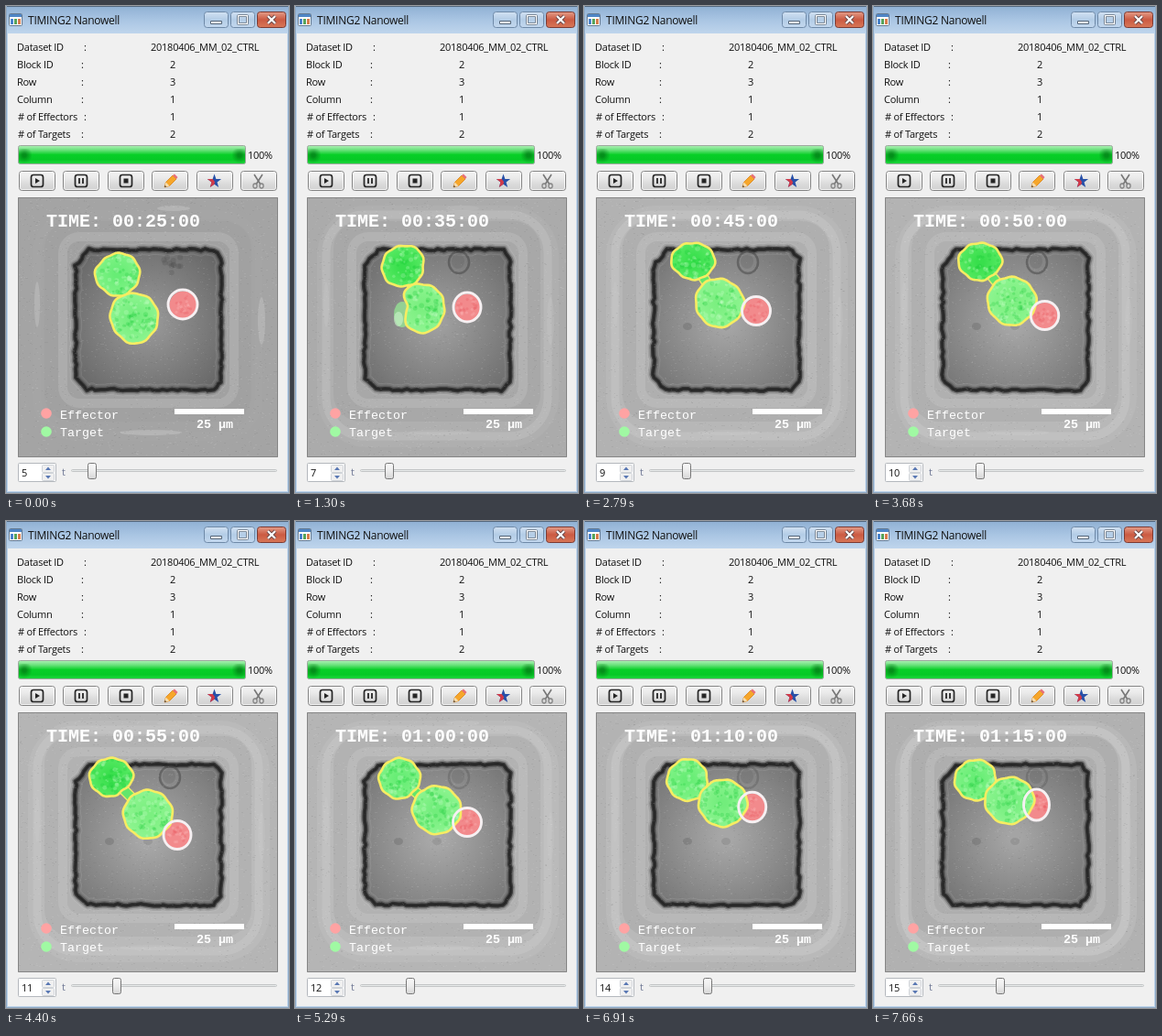
An HTML page with a canvas that plays this animation: 309 by 532 pixels, repeating every 8000 ms.

```html
<!DOCTYPE html>
<html lang="en">
<head>
<meta charset="utf-8">
<title>Nanowell viewer</title>
<style>
  html, body { margin: 0; width: 100%; height: 100%; overflow: hidden; background: #f0f0f0; }
  canvas, svg { position: absolute; left: 0; top: 0; width: 309px; height: 532px; display: block; }
  text { white-space: pre; }
  .ui { font: 11px "Open Sans", sans-serif; letter-spacing: -.25px; fill: #111; }
  .title { font-size: 12px; }
  .mid { text-anchor: middle; }
  .mono { font: bold 13.33px "Liberation Mono", monospace; fill: #fff; }
  .clock { font-size: 20px; }
  .note { font-weight: normal; }
</style>
</head>
<body>
<canvas id="view" width="309" height="532"></canvas>
<svg viewBox="0 0 309 532">
  <g class="ui">
    <text class="title" x="24" y="20">TIMING2 Nanowell</text>
    <text x="12" y="49">Dataset ID</text><text x="85" y="49">:</text>
    <text x="158" y="49">20180406_MM_02_CTRL</text>
    <text x="12" y="68">Block ID</text><text x="82" y="68">:</text>
    <text class="mid" x="182" y="68">2</text>
    <text x="12" y="87">Row</text><text x="82" y="87">:</text>
    <text class="mid" x="182" y="87">3</text>
    <text x="12" y="106">Column</text><text x="82" y="106">:</text>
    <text class="mid" x="182" y="106">1</text>
    <text x="13" y="125"># of Effectors</text><text x="85" y="125">:</text>
    <text class="mid" x="182" y="125">1</text>
    <text x="13" y="144"># of Targets</text><text x="82" y="144">:</text>
    <text class="mid" x="182" y="144">2</text>
    <text x="264" y="167">100%</text>
    <text id="step" x="17" y="514"></text>
    <text x="61" y="513" style="fill:#6f7894">t</text>
  </g>
  <g class="mono">
    <text id="clock" class="clock" x="44" y="241"></text>
    <text class="note" x="59" y="451">Effector</text>
    <text class="note" x="59" y="470">Target</text>
    <text x="208" y="461">25 μm</text>
  </g>
</svg>
<script>
const ctx = document.getElementById('view').getContext('2d');
const stepText = document.getElementById('step');
const clockText = document.getElementById('clock');

const LOOP = 8000, FIRST = 5;
const CHANGES = [430, 1300, 2040, 2790, 3680, 4400, 5290, 6170, 6910, 7660];
const KEYS = [5, 7, 8, 9, 11, 13, 15];

// Centre, then eight radii clockwise from the right
const UPPER = [
  [122, 293, 24, 23, 24, 23, 25, 22, 23, 24],
  [118, 285, 22, 22, 21, 23, 23, 23, 23, 25],
  [118, 283, 21, 22, 23, 22, 22, 22, 23, 23],
  [119, 279, 24, 21, 20, 20, 24, 22, 20, 22],
  [115, 280, 24, 19, 21, 22, 24, 22, 21, 22],
  [114, 283, 21, 22, 23, 22, 22, 22, 24, 22],
  [112, 283, 22, 23, 22, 22, 23, 22, 22, 23]
];
const LOWER = [
  [140, 341, 26, 26, 28, 25, 26, 28, 27, 27],
  [140, 329, 23, 25, 28, 26, 17, 27, 25, 24],
  [140, 331, 27, 26, 27, 25, 26, 27, 26, 26],
  [148, 324, 27, 26, 27, 26, 26, 27, 26, 25],
  [155, 320, 27, 26, 27, 26, 27, 26, 26, 26],
  [154, 311, 27, 26, 26, 25, 26, 26, 26, 26],
  [149, 305, 27, 25, 26, 26, 27, 25, 25, 26]
];
// Centre and radii
const EFFECTOR = [
  [193, 326, 16, 16], [188, 329, 15, 16], [184, 341, 15.5, 16], [188, 333, 15.5, 15.5],
  [187, 343, 15, 15.5], [189, 315, 16, 15.5], [178.5, 310, 14, 17]
];
const LIGHT = [[164], [171], [186], [178], [181], [181], [177]];
const DEPTH = [[.05], [.55], [.75], [.6], [.6], [.6], [.8]];

const gray = (v, a = 1) => `rgba(${v | 0},${v | 0},${v | 0},${a})`;

function random(seed) {
  let s = seed >>> 0;
  return () => (s = (s * 1664525 + 1013904223) >>> 0) / 4294967296;
}

function pose(list, t) {
  let i = 0;
  while (i < KEYS.length - 2 && t >= KEYS[i + 1]) i++;
  const p = (t - KEYS[i]) / (KEYS[i + 1] - KEYS[i]);
  return list[i].map((v, k) => v + (list[i + 1][k] - v) * p);
}

function rounded(x, y, w, h, r, fill, line, width = 1) {
  ctx.beginPath();
  ctx.roundRect(x, y, w, h, r);
  if (fill) { ctx.fillStyle = fill; ctx.fill(); }
  if (line) { ctx.strokeStyle = line; ctx.lineWidth = width; ctx.stroke(); }
}

function shape(points, fill, line, width = 1) {
  ctx.beginPath();
  points.forEach(([x, y]) => ctx.lineTo(x, y));
  ctx.closePath();
  if (fill) { ctx.fillStyle = fill; ctx.fill(); }
  if (line) { ctx.strokeStyle = line; ctx.lineWidth = width; ctx.stroke(); }
}

function lines(list, color, width) {
  ctx.strokeStyle = color;
  ctx.lineWidth = width;
  ctx.beginPath();
  for (const [a, b, c, d] of list) { ctx.moveTo(a, b); ctx.lineTo(c, d); }
  ctx.stroke();
}

function dot(x, y, rx, ry, fill) {
  ctx.fillStyle = fill;
  ctx.beginPath();
  ctx.ellipse(x, y, rx, ry, 0, 0, 7);
  ctx.fill();
}

function ramp(y0, y1, ...stops) {
  const g = ctx.createLinearGradient(0, y0, 0, y1);
  stops.forEach((c, i) => g.addColorStop(i / (stops.length - 1), c));
  return g;
}

function glow(x, y, r0, r1, from, to) {
  const g = ctx.createRadialGradient(x, y, r0, x, y, r1);
  g.addColorStop(0, from);
  g.addColorStop(1, to);
  return g;
}

function drawWindow() {
  ctx.fillStyle = '#bcd2ea';
  ctx.fillRect(0, 0, 309, 532);
  ctx.fillStyle = ramp(0, 30, '#8fb0d3', '#a9c5e3', '#bfd5ec');
  ctx.fillRect(0, 0, 309, 30);
  ctx.fillStyle = '#f0f0f0';
  ctx.fillRect(2, 30, 305, 500);
  lines([[0, .5, 309, .5]], '#56697e', 1);
  lines([[.5, 0, .5, 532], [308.5, 0, 308.5, 532], [0, 531.5, 309, 531.5]], '#8fa9c4', 1);

  rounded(3.5, 8.5, 14, 13, 1, '#fff', '#62788f');
  ctx.fillStyle = '#4f86c6';
  ctx.fillRect(4, 9, 13, 3);
  ['#4a83cc', '#56a35a', '#d77c4c'].forEach((c, i) => {
    ctx.fillStyle = c;
    ctx.fillRect(5 + i * 4, 14, 3, 6);
  });

  const blue = ramp(6, 24, '#d4e3f3', '#b3cce6', '#c4d9ef');
  rounded(216.5, 6.5, 26, 17, 3, blue, '#6f8aa8');
  rounded(245.5, 6.5, 26, 17, 3, blue, '#6f8aa8');
  rounded(274.5, 6.5, 31, 17, 3, ramp(6, 24, '#e5a08c', '#cb5a42', '#d97a5a'), '#7c3a32');
  rounded(223.5, 16.5, 12, 3, 0, '#fff', '#536477');
  rounded(253.5, 10.5, 10, 9, 1, null, '#536477', 3);
  rounded(253.5, 10.5, 10, 9, 0, null, '#fff', 1.4);
  const cross = [[286, 11, 294, 19], [294, 11, 286, 19]];
  lines(cross, '#6b4747', 4);
  lines(cross, '#fff', 2.2);
}

function drawProgress() {
  rounded(13.5, 152.5, 248, 20, 2, ramp(152, 173, '#b6f2bd', '#6be27c', '#08cf28', '#06c926', '#22d941'), '#9da89d');
  ctx.fillStyle = glow(20, 163, 2, 9, 'rgba(0,110,18,.65)', 'rgba(0,130,20,0)');
  ctx.fillRect(14, 156, 14, 16);
  ctx.fillStyle = glow(255, 163, 2, 9, 'rgba(0,110,18,.65)', 'rgba(0,130,20,0)');
  ctx.fillRect(247, 156, 14, 16);
}

function drawButtons() {
  const face = ramp(180, 202, '#f4f4f4', '#ebebeb', '#dadada', '#cfcfcf');
  for (let i = 0; i < 6; i++) {
    const x = Math.round(14 + i * 48.4) + .5;
    rounded(x, 180.5, 39, 21, 3, face, '#838383');
    rounded(x + 1, 181.5, 37, 19, 2, null, 'rgba(255,255,255,.7)');
  }
  const ink = '#252525';
  for (const x of [34, 82, 131]) rounded(x - 6.5, 184.5, 13, 13, 2.5, null, ink, 1.7);
  shape([[32, 188], [37, 191], [32, 194]], ink);
  lines([[80, 188, 80, 194], [84, 188, 84, 194]], ink, 1.8);
  ctx.fillStyle = ink;
  ctx.fillRect(128.5, 188.5, 5, 5);

  shape([[173, 198], [174.5, 192.5], [182, 185], [186, 189], [178.5, 196.5]], '#f6a62a', '#d98218', .8);
  shape([[182, 185], [184, 183.5], [187.5, 187], [186, 189]], '#e8707a');
  shape([[173, 198], [174.5, 192.5], [178.5, 196.5]], '#f5dcae');
  shape([[173, 198], [173.6, 195.8], [175.2, 197.4]], '#4a3828');

  const star = Array.from({ length: 10 }, (_, i) => {
    const a = i * Math.PI / 5 - Math.PI / 2, r = i % 2 ? 3.2 : 8;
    return [227.5 + r * Math.cos(a), 191.5 + r * Math.sin(a)];
  });
  shape(star, '#2750a8');
  shape([star[7], star[8], star[9], [228, 192], star[5], star[6]], '#d33a48');

  lines([[271, 184, 278, 195], [280, 184, 273, 195]], '#777', 1.6);
  ctx.strokeStyle = '#858585';
  ctx.lineWidth = 1.3;
  for (const x of [272, 279]) {
    ctx.beginPath();
    ctx.ellipse(x, 196.5, 2.1, 2.5, 0, 0, 7);
    ctx.stroke();
  }
}

function drawSlider(t) {
  rounded(13.5, 499.5, 41, 20, 1, '#fff', '#b4b8bd');
  for (const y of [501, 510]) rounded(39.5, y + .5, 13, 8, 1, '#f0f0f0', '#cfd3d8');
  shape([[43, 507], [46, 503.5], [49, 507]], '#5877b3');
  shape([[43, 513], [46, 516.5], [49, 513]], '#5877b3');
  rounded(71.5, 506.5, 224, 2, 1, '#e7eaea', '#c2c4c5');
  const x = Math.round(94 + (t - FIRST) * 4.5);
  rounded(x - 4.5, 499.5, 9, 17, 2, ramp(499, 517, '#fafafa', '#ececec', '#d5d5d5'), '#777');
}

// Rough edge of the well: a rounded box with a cut top-left corner
function wellEdge(t) {
  const rnd = random(71 + t * 3);
  const corners = [[91, 266], [227, 266], [235, 275], [235, 410], [226, 420], [88, 419], [76, 407], [76, 284]];
  const points = [];
  corners.forEach(([x, y], i) => {
    const [u, v] = corners[(i + 1) % corners.length];
    const n = Math.max(2, Math.round(Math.hypot(u - x, v - y) / 5));
    for (let k = 0; k < n; k++) {
      points.push([x + (u - x) * k / n + (rnd() - .5) * 2.4, y + (v - y) * k / n + (rnd() - .5) * 2.4]);
    }
  });
  return points;
}

function drawWell(t) {
  const [light] = pose(LIGHT, t), [depth] = pose(DEPTH, t);
  const rnd = random(t * 977);
  ctx.fillStyle = gray(light);
  ctx.fillRect(13, 209, 284, 284);

  rounded(24, 218, 264, 264, 55, gray(light + 9 * depth));
  rounded(34, 228, 242, 242, 42, null, gray(225, .32 * depth), 9);
  rounded(42, 235, 226, 219, 30, gray(light - 3));
  rounded(62, 252, 187, 182, 18, null, gray(225, .17), 10);

  // pale scratches
  for (const [x, y, rx, ry] of [[279, 344, 4, 26], [183, 221, 18, 3], [158, 466, 34, 3], [34, 326, 3, 25]]) {
    dot(x, y, rx, ry, gray(220, .26 * (1.1 - depth)));
  }

  const edge = wellEdge(t);
  shape(edge, glow(155, 345, 8, 112, gray(light - 13), gray(light - 67)));
  ctx.save();
  ctx.lineJoin = 'round';
  shape(edge, null, gray(225, .13), 13);
  shape(edge, null, gray(40, .13), 11);
  shape(edge, null, gray(40, .3), 7.5);
  shape(edge, null, gray(34, .7), 4.5);
  shape(edge, null, gray(28, .65), 2);
  ctx.restore();

  // debris beside the cells
  if (t < 7) {
    for (let i = 0; i < 12; i++) dot(171 + rnd() * 20, 274 + rnd() * 18, 3, 3, gray(65, .2));
  } else {
    ctx.beginPath();
    ctx.ellipse(179, 280, 11, 12, 0, 0, 7);
    ctx.strokeStyle = gray(65, t < 12 ? .5 : .25);
    ctx.lineWidth = 2.5;
    ctx.stroke();
    dot(178, 279, 7, 8, gray(90, .25));
  }
  if (t >= 8) {
    dot(113, 350, 5, 4, gray(75, .23));
    dot(155, 350, 5, 4, gray(75, .16));
  }
  // soft grain
  for (let i = 0; i < 2600; i++) {
    ctx.fillStyle = gray(rnd() < .5 ? 90 : 235, .1);
    ctx.fillRect(14 + rnd() * 281 | 0, 210 + rnd() * 281 | 0, 1 + rnd() * 2 | 0, 1);
  }
}

function outline([cx, cy, ...r], phase) {
  return Array.from({ length: 64 }, (_, i) => {
    const k = i >> 3, p = (i & 7) / 8, a = i * Math.PI / 32;
    const [q, b, c, d] = [7, 0, 1, 2].map(n => r[(k + n) & 7]);
    const size = b + .5 * p * (c - q + p * (2 * q - 5 * b + 4 * c - d + p * (3 * (b - c) + d - q)))
      + .5 * Math.sin(9 * a + phase);
    return [cx + size * Math.cos(a), cy + size * Math.sin(a)];
  });
}

function drawTarget(cell, t, dark, bright, seed) {
  const edge = outline(cell, t + seed), [cx, cy] = cell;
  const rnd = random(t * 131 + seed);
  ctx.save();
  shape(edge, glow(cx, cy, 4, 29, dark, bright));
  ctx.clip();
  for (let i = 0; i < 95; i++) {
    const a = rnd() * 7, r = Math.sqrt(rnd()) * 25, size = .8 + rnd() * 2;
    dot(cx + r * Math.cos(a), cy + r * Math.sin(a), size, size,
      rnd() < .5 ? 'rgba(20,195,50,.24)' : 'rgba(205,255,205,.25)');
  }
  ctx.restore();
  ctx.lineJoin = 'round';
  shape(edge, null, '#f7ec62', 2.6);
}

function drawCells(t) {
  const upper = pose(UPPER, t), lower = pose(LOWER, t);
  const [x, y, rx, ry] = pose(EFFECTOR, t);
  const rnd = random(t * 57);

  dot(x + .5, y + .5, rx - 1, ry - 1, '#f28a8c');
  for (let i = 0; i < 28; i++) {
    const a = rnd() * 7, r = Math.sqrt(rnd()) * 11;
    dot(x + r * Math.cos(a), y + r * Math.sin(a), 1.6, 1.6,
      rnd() < .5 ? 'rgba(232,85,95,.28)' : 'rgba(255,195,195,.25)');
  }

  if (t === 6 || t === 7) {
    dot(117, 337, 9, 14, 'rgba(150,238,150,.7)');
    dot(113, 342, 5, 8, 'rgba(205,245,205,.6)');
  }
  const bridge = [[upper[0], upper[1], lower[0], lower[1]]];
  lines(bridge, '#e5ea68', 12);
  lines(bridge, '#62e66c', 9);

  const rich = t >= 7 && t <= 11;
  drawTarget(upper, t, rich ? '#38df4c' : '#67ed75', rich ? '#62ed6b' : '#88f48c', 17);
  drawTarget(lower, t, rich ? '#7bef80' : '#72ed7c', '#90f592', 43);

  ctx.beginPath();
  ctx.ellipse(x, y, rx, ry, 0, 0, 7);
  ctx.strokeStyle = '#f6f0f2';
  ctx.lineWidth = 2.9;
  ctx.stroke();
}

function drawLegend(t) {
  const pale = t === 8;
  dot(44, 445, 5.8, 5.8, pale ? '#ffbcbc' : '#ffa3a3');
  dot(44, 465, 5.8, 5.8, pale ? '#b5fbb5' : '#a0f9a3');
  ctx.fillStyle = '#fff';
  ctx.fillRect(184, 440, 76, 6);
}

function draw(t) {
  drawWindow();
  drawProgress();
  drawButtons();
  ctx.save();
  ctx.beginPath();
  ctx.rect(13, 209, 284, 284);
  ctx.clip();
  drawWell(t);
  drawCells(t);
  drawLegend(t);
  ctx.restore();
  rounded(13.5, 209.5, 283, 283, 0, null, '#858585');
  drawSlider(t);

  const pad = n => String(n).padStart(2, '0'), minutes = t * 5;
  stepText.textContent = t;
  clockText.textContent = `TIME: ${pad(Math.floor(minutes / 60))}:${pad(minutes % 60)}:00`;
}

const start = performance.now();
let shown = 0;
function tick() {
  const now = (performance.now() - start) % LOOP;
  const t = FIRST + CHANGES.filter(c => now >= c).length;
  if (t !== shown) draw(shown = t);
  requestAnimationFrame(tick);
}
tick();
</script>
</body>
</html>
```
